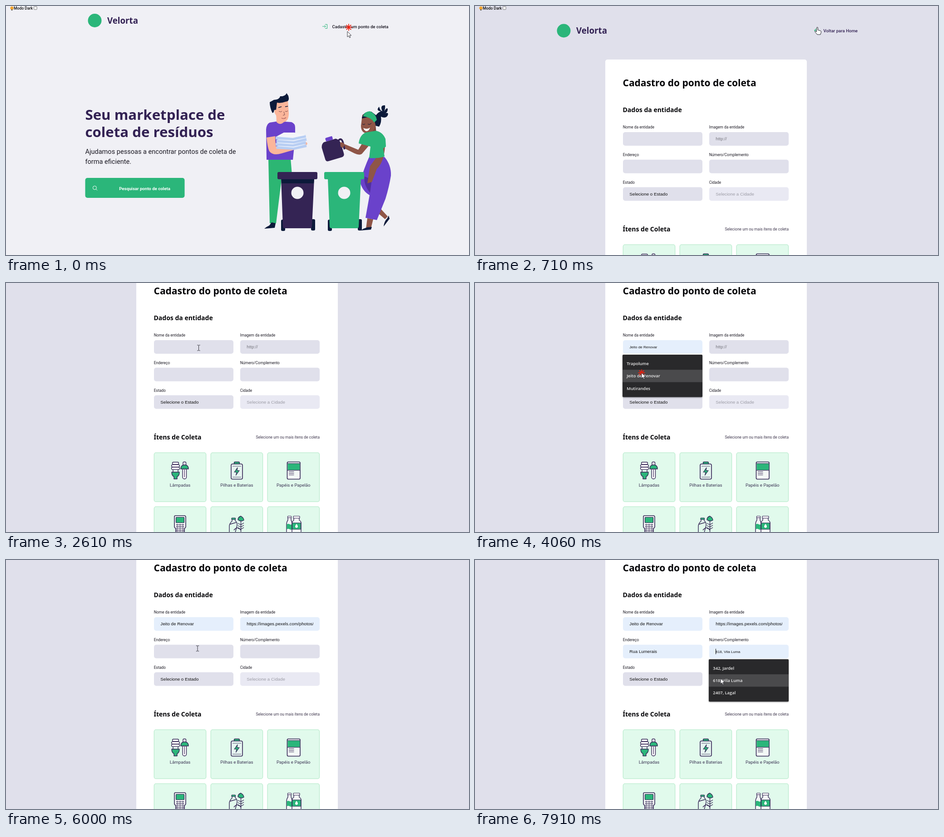
These frames come from a looping animation (1020 by 549 pixels, 8000 ms). An HTML page with a canvas:

```html
<!DOCTYPE html>
<html lang="pt-BR">
<head>
<meta charset="utf-8">
<title>Cadastro do ponto de coleta</title>
<style>
html, body { margin: 0; width: 100%; height: 100%; overflow: hidden; background: #f0f0f5; }
canvas { display: block; width: 1020px; height: 549px; }
</style>
</head>
<body>
<canvas id="stage"></canvas>
<script>
const W = 1020, H = 549, LOOP = 8000;
const canvas = document.getElementById('stage');
const g = canvas.getContext('2d');
const dpr = window.devicePixelRatio || 1;
canvas.width = W * dpr;
canvas.height = H * dpr;

const GREEN = '#2bb67a', PLUM = '#342454', NAVY = '#0c1a3a', PURPLE = '#6a42cb';
const PEACH = '#fbb59a', BROWN = '#8f5547', FIELD = '#e0e0eb', FILLED = '#e5effc', INK = '#322153';
const HEAD = '"Noto Sans", "Open Sans", sans-serif';
const BODY = 'Roboto, sans-serif';
const INPUT = '"Liberation Sans", Arial, sans-serif';
const MENU = '"Open Sans", "Noto Sans", sans-serif';

function text(s, x, y, size, family, color, weight = 400, align = 'left') {
  g.font = `${weight} ${size}px ${family}`;
  g.fillStyle = color;
  g.textAlign = align;
  g.fillText(s, x, y);
}
function paint(path, fill, stroke, lw = 1.4) {
  const args = path ? [path] : [];
  if (fill) { g.fillStyle = fill; g.fill(...args); }
  if (stroke) { g.strokeStyle = stroke; g.lineWidth = lw; g.stroke(...args); }
}
function box(x, y, w, h, r, fill, stroke, lw = 1.2) {
  g.beginPath();
  g.roundRect(x, y, w, h, r);
  paint(null, fill, stroke, lw);
}
const shape = (d, fill, stroke, lw) => paint(new Path2D(d), fill, stroke, lw);
const line = (d, color, lw) => shape(d, null, color, lw);
function disc(x, y, r, fill) {
  g.beginPath();
  g.arc(x, y, r, 0, 7);
  paint(null, fill);
}
// Draw inside a clipping rectangle
function clipped(x, y, w, h, draw) {
  g.save();
  g.beginPath();
  g.rect(x, y, w, h);
  g.clip();
  draw();
  g.restore();
}
// Last entry whose time has passed
const latest = (keys, t) => keys.reduce((hit, k) => k[0] <= t ? k : hit, null);

/* ---------- timeline ---------- */
const OPEN_FORM = 710;
const scrollKeys = [[0, 0], [1790, 30], [1920, 110], [2040, 152]];
const cursorKeys = [
  [0, 752, 56], [130, 754, 47], [840, 720, 72], [960, 646, 129], [1100, 575, 190], [1230, 529, 236],
  [1370, 486, 288], [1520, 479, 291], [1640, 477, 299], [2190, 450, 280], [2320, 421, 250],
  [2460, 425, 163], [2610, 424.5, 143], [3410, 400, 172], [3540, 385, 180], [3790, 370, 192],
  [3920, 367, 198], [4320, 420, 180], [4450, 500, 155], [4580, 535, 144], [4970, 555, 165],
  [5100, 560, 181], [5620, 510, 183], [5750, 440, 195], [5880, 422, 195], [6440, 390, 226],
  [6570, 367, 247], [6710, 366, 259], [7220, 430, 245], [7350, 540, 200], [7630, 537, 243],
  [7770, 541, 261]
];
const kindKeys = [
  [0, 'arrow'], [130, 'hand'], [840, 'arrow'], [2460, 'beam'], [3410, 'arrow'], [4580, 'beam'],
  [4970, 'arrow'], [5880, 'beam'], [6440, 'arrow'], [6710, 'lightBeam'], [7090, 'arrow'],
  [7350, 'beam'], [7630, 'arrow']
];
const clicks = [[0, 130, 755, 47], [3920, 4200, 367, 198], [5350, 5490, 560, 181], [7090, 7220, 366, 259]];
const PHOTOS = 'https://images.pexels.com/photos/';
const menus = [
  { x: 326, y: 278, w: 176, open: 3140, close: 4200, hover: [[3410, 0], [3790, 1]],
    rows: ['Trapolume', 'Jeito de Renovar', 'Mutirandes'] },
  { x: 516, y: 278, w: 346, open: 4830, close: 5490, hover: [[4970, 0]],
    rows: [PHOTOS + '3735195/pexels-photo-3735195.jpeg?auto', PHOTOS + '2453797/pexels-photo-2453797.jpeg?auto',
           PHOTOS + '159751/book-address-book-learning-learning'] },
  { x: 326, y: 338.7, w: 176, open: 6290, close: 7220, hover: [[6440, 0], [6850, 1]],
    rows: ['Rua Borvelhas', 'Rua Lumerais', 'Rua Olitanha'] },
  { x: 516, y: 338.7, w: 176, open: 7500, close: 9000, hover: [[7630, 0], [7910, 1]],
    rows: ['342, Jardel', '618, Vila Luma', '2407, Lagal'] }
];
const picked = (m, t) => { const k = latest(m.hover, t); return k ? k[1] : -1; };

/* ---------- shared header ---------- */
function header(y) {
  disc(13, 4.5, 3.6, '#f2a32c');
  box(11.5, 7, 3, 3, 1, '#6d6250');
  text('Modo Dark', 17, 8.3, 8.6, BODY, '#111', 500);
  box(61.5, 1.2, 6.6, 6.6, 1, '#fff', '#666', 0.9);
  disc(195.5, y, 15, GREEN);
  text('Velorta', 223, y + 6.6, 18.7, HEAD, INK, 700);
}

/* ---------- home page ---------- */
function man() {
  shape('M578 336H627L630 372L607 382L595 479H581Z', '#2cb673');
  shape('M585 477L594 479L592 489L569 491Q575 486 580 484Z', NAVY);
  shape('M581 257L600 254L629 256Q637 259 637 268V290L632 339H574L573 272Q574 260 581 257Z', PURPLE);
  shape('M595 235L596 256Q604 264 612 256L612 246Z', PEACH);
  shape('M594 212L621 207L623 236Q623 254 612 256Q599 256 595 241Q590 235 592 229Z', PEACH);
  shape('M587 236Q581 224 581 212Q587 209 590 207Q603 206 604 199L609 199Q617 197 618 192L622 198L623 203Q624 210 616 211Q605 215 597 213L595 229Q590 228 590 234Z', NAVY);
  line('M600 224L607 222M615 222L621 221', NAVY, 1.6);
  line('M601 232Q605 235 608 232M615 232Q618 234 621 231M612 233L614 240L610 241', '#6d3f47', 0.9);
  line('M607 247Q612 250 617 246', '#9a4c50', 1.1);
  shape('M574 290L593 287L594 309L635 311L655 301Q662 298 664 303Q663 309 652 312L607 325Q588 331 580 320Q576 311 574 290Z', PEACH);
  for (let i = 3; i >= 0; i--) {
    g.save();
    g.translate((i % 2) * 1.5, i * 7);
    shape('M594 288L616 288L660 284L661 290L633 296L594 294Z', '#b8cef3');
    shape('M594 288L613 284L660 284L632 291Z', '#edf2fc');
    g.restore();
  }
  shape('M597 287L612 279L635 279L660 285L633 290Z', '#f4f4f9');
}
function woman() {
  shape('M819 440L841 464L835 470L812 450Z', BROWN);
  shape('M843 462L845 469L832 486Q833 475 840 468Z', NAVY);
  shape('M796 468L809 470L804 490L793 491Z', BROWN);
  shape('M781 495Q788 490 796 488L806 487L804 493Z', NAVY);
  shape('M800 333H834Q849 351 848 374Q844 399 836 425L817 472L792 467L801 417Q785 408 780 388Q789 357 800 333Z', PURPLE);
  shape('M790 376Q787 393 802 412L806 382Z', '#512f9f');
  shape('M815 241Q819 235 826 232Q814 231 822 222Q824 231 829 232Q823 218 835 219Q836 228 832 234Q840 221 841 228Q840 236 834 237Q844 233 841 241Q837 249 826 244Q828 256 822 266L810 263Z', NAVY);
  shape('M798 263L814 261L816 282L798 286Z', '#7c453b');
  shape('M785 240Q797 233 809 242L814 262Q811 280 796 281Q782 280 782 264Z', BROWN);
  shape('M784 248Q786 232 805 233L822 246Q821 260 817 264Q811 247 797 245Z', NAVY);
  shape('M786 243Q791 232 802 232Q815 238 817 251L811 257Q804 245 786 243Z', GREEN);
  shape('M787 269Q796 273 802 268Q799 277 793 276Q789 274 787 269Z', '#fff');
  line('M785 260Q788 263 791 260M797 260Q801 263 805 258', NAVY, 1);
  shape('M738 302L747 305L776 317L787 299L801 306L784 326Q779 330 768 325L738 310Z', BROWN);
  shape('M816 304L835 309Q833 344 817 359L806 388L796 391L802 353L818 331Z', BROWN);
  shape('M792 279L815 275Q830 278 836 293L837 310L831 314L834 332Q816 337 800 335L803 310L777 303Q779 285 792 279Z', GREEN);
  g.save();
  g.translate(719.5, 315.5);
  g.rotate(-0.29);
  line('M17 -14Q26 -20 26 -8L25 8', PLUM, 4);
  shape('M-14 -20H13Q20 -16 21 -8L21 16Q21 23 14 23H-16Q-22 23 -22 17V-10Q-20 -18 -14 -20Z', PLUM);
  box(-9, -28, 16, 8, 2, PURPLE);
  g.restore();
  shape('M736 301Q744 299 746 307L742 313L737 310Z', BROWN);
}
function bin(x, color, rim) {
  box(x + 8, 471, 9, 25, 3, NAVY);
  box(x + 74, 470, 9, 25, 3, NAVY);
  shape(`M${x + 8} 380H${x + 81}L${x + 76} 486Q${x + 76} 490 ${x + 72} 490H${x + 16}Q${x + 12} 490 ${x + 12} 486Z`, color);
  shape(`M${x + 9} 381H${x + 81}L${x + 80} 391H${x + 9}Z`, rim);
  box(x, 366, 88, 16, 3, color);
  disc(x + 44, 412, 13.5, '#f0f0f5');
}
function home() {
  g.fillStyle = '#f0f0f5';
  g.fillRect(0, 0, W, H);
  header(32);
  line('M703 40.5H707.5V49.5H703M697 45H704M701.5 42.3L704.3 45L701.5 47.7', GREEN, 1);
  text('Cadastre um ponto de coleta', 842.5, 48.5, 9.65, BODY, '#16131f', 500, 'right');
  text('Seu marketplace de', 174.5, 251.3, 31.2, HEAD, INK, 700);
  text('coleta de resíduos', 174.5, 288.8, 31.2, HEAD, INK, 700);
  text('Ajudamos pessoas a encontrar pontos de coleta de', 174.5, 326, 14.55, BODY, '#1c1a24');
  text('forma eficiente.', 174.5, 348.3, 14.55, BODY, '#1c1a24');
  box(174.5, 379, 219, 44, 5, GREEN);
  line('M199.4 400.8A4 4 0 1 1 191.4 400.8A4 4 0 1 1 199.4 400.8M198.4 403.8L201 406.5', '#fff', 1);
  text('Pesquisar ponto de coleta', 305.5, 405.5, 9.65, BODY, '#fff', 700, 'center');
  man();
  woman();
  bin(598, PLUM, NAVY);
  bin(701, GREEN, GREEN);
}

/* ---------- form page ---------- */
const icons = [
  () => {
    shape('M365 417H382Q382 425 377 427V432H370V427Q365 425 365 417Z', GREEN, PLUM);
    for (let i = 0; i < 3; i++) box(364.5 + (i ? 0 : 2), 395 + i * 5.6, i ? 18 : 14, 5, 2.5, '#fff', PLUM, 1.3);
    line('M368 412V417M379 412V417', PLUM, 1.4);
    box(389, 409, 8.5, 23, 4, '#fff', PLUM, 1.4);
    line('M393.2 411V428', PLUM, 1.2);
    box(390, 394.5, 6.5, 8, 2, '#fff', PLUM, 1.4);
    shape('M385 410Q385 401 393.3 401Q402 401 402 410Z', GREEN, PLUM);
  },
  () => {
    box(502.5, 394.5, 12, 6, 2, GREEN, PLUM, 1.4);
    box(496, 399, 25, 33.5, 3, '#e6f5f0', PLUM, 1.6);
    line('M499 404H518M499 428H518', PLUM, 0.8);
    shape('M510 407L503 417H508L506.5 424L514 413.5H509Z', GREEN, PLUM, 1.1);
  },
  () => {
    box(619.5, 394.5, 28.5, 38, 2.5, '#f3f8f6', PLUM, 1.6);
    g.fillStyle = GREEN;
    g.fillRect(620.5, 398, 26.8, 14.5);
    line('M620 398H648M620 412.8H648M623 416H634.5M623 419.5H634.5M623 423H634.5', PLUM, 1.2);
  },
  () => {
    shape('M371 515Q371 513 373 513H393Q396 513 396 516V538L393 542V560H374V542L371 538Z', '#f3f8f6', PLUM, 1.6);
    box(374.5, 516.5, 18, 12, 1, GREEN, PLUM, 1.2);
    for (let i = 0; i < 12; i++) box(375.5 + i % 3 * 6, 532 + Math.floor(i / 3) * 4.5, 4, 2, 0.5, null, PLUM, 1);
  },
  () => {
    shape('M498 519H505V524Q510 528 509 535L505 550H492V537Q492 530 498 525Z', '#e1faec', PLUM);
    box(497, 518, 8.5, 3.5, 1, GREEN, PLUM, 1.2);
    line('M493 532L507 528M502 545Q511 534 518 546', PLUM, 1.4);
    shape('M511 522Q511 516 517.5 514Q524 518 524 523Q517 527 511 522Z', GREEN, PLUM);
    line('M517.5 525V550M511 530L517.5 533L524 529M511 535L517.5 538L524 534M511 541L517.5 543L524 539', PLUM, 1.3);
  },
  () => {
    shape('M621 517H628V523Q632 529 631 550H618V533Q618 527 621 523Z', '#f3f8f6', PLUM);
    shape('M618.6 532Q622 530 625 532T631 531V543Q628 545 625 543T618.6 543Z', GREEN);
    box(620.5, 514, 8, 3.5, 1, '#fff', PLUM, 1.2);
    shape('M634 518H646V523Q651 526 650 531V550H630V531Q630 526 634 523Z', '#f3f8f6', PLUM);
    box(633, 514, 14, 4.5, 1, '#fff', PLUM, 1.2);
    box(630.6, 529, 19, 14, 0, GREEN, PLUM, 1);
    shape('M640 531Q646 539 640 540Q634 539 640 531Z', '#fff');
  }
];

function field(x, y, label, value, color, fill = FIELD, size = 9.75) {
  text(label, x - 0.3, y - 8, 8.5, BODY, '#1c1a24');
  box(x, y, 175, 30, 5, fill);
  clipped(x + 14, y, 147, 30, () => {
    text(value, x + 14.3, y + (size < 9 ? 17.8 : 18.4), size, INPUT, color);
  });
}
function entry(i, label, hint, t) {
  const m = menus[i], pick = picked(m, t), done = t >= m.close;
  const on = pick >= 0;
  field(m.x, m.y, label, on ? m.rows[pick] : hint, on ? '#111' : '#75757d',
    on ? FILLED : FIELD, on && !done ? 8.1 : 9.75);
  const focus = t - m.open;
  if (focus >= 0 && !done && Math.floor(focus / 530) % 2 === 0) {
    g.fillStyle = '#111';
    g.fillRect(m.x + 14, m.y + 9, 1, 12);
  }
}
function menu(m, t) {
  if (t < m.open || t >= m.close) return;
  const y = m.y + 32, x = m.x - 1, pick = picked(m, t);
  const rowTop = i => y + 6 + i * 27.3;
  g.save();
  g.shadowColor = 'rgba(0,0,0,.4)';
  g.shadowBlur = 3 * dpr;
  g.shadowOffsetY = dpr;
  box(x, y, m.w, 93.5, 2, '#29292b');
  g.restore();
  if (pick >= 0) {
    g.fillStyle = '#4a4a4c';
    g.fillRect(x, rowTop(pick), m.w, 27.3);
  }
  clipped(x, y, m.w - 8.5, 94, () => {
    m.rows.forEach((s, i) => text(s, x + 9.3, rowTop(i) + 17, 9.35, MENU, '#ececec', 600));
  });
}
function form(t) {
  g.fillStyle = FIELD;
  g.fillRect(0, 0, W, H);
  g.save();
  g.translate(0, -latest(scrollKeys, t)[1]);
  header(54.5);
  line('M748 54H756M752 50L748 54L752 58', GREEN, 1.2);
  text('Voltar para Home', 843, 57.8, 9.65, BODY, INK, 500, 'right');
  box(287, 118, 444, 900, 5, '#fff');
  text('Cadastro do ponto de coleta', 325.5, 176.6, 21, HEAD, '#050508', 700);
  text('Dados da entidade', 325.5, 233.6, 14, HEAD, '#050508', 700);
  entry(0, 'Nome da entidade', '', t);
  entry(1, 'Imagem da entidade', 'http://', t);
  entry(2, 'Endereço', '', t);
  entry(3, 'Número/Complemento', '', t);
  field(326, 399.5, 'Estado', 'Selecione o Estado', '#111');
  field(516, 399.5, 'Cidade', 'Selecione a Cidade', '#9c9ca6', '#e9e9f3');
  text('Ítens de Coleta', 325.5, 496.8, 14, HEAD, '#050508', 700);
  text('Selecione um ou mais ítens de coleta', 691, 494.8, 8.5, BODY, '#40394f', 400, 'right');
  const names = ['Lâmpadas', 'Pilhas e Baterias', 'Papéis e Papelão'];
  icons.forEach((draw, i) => {
    const x = 326.3 + i % 3 * 124.9, y = i < 3 ? 526.2 : 645.2;
    box(x, y, 114.4, 108, 4, '#e1faec', '#b9ebcd', 1.3);
    if (i < 3) text(names[i], x + 57.2, 601.4, 9.75, BODY, '#3b3454', 400, 'center');
    g.save();
    g.translate(0, 152);
    draw();
    g.restore();
  });
  menus.forEach(m => menu(m, t));
  g.restore();
}

/* ---------- pointer ---------- */
function star(x, y) {
  g.save();
  g.translate(x, y);
  for (let i = 0; i < 4; i++) {
    line('M-7.5 0H7.5', '#f0200f', 1.8);
    g.rotate(Math.PI / 4);
  }
  g.restore();
}
const beam = color =>
  line('M-3.2 -6H-0.8L0 -5.2L0.8 -6H3.2M0 -5.2V5.2M-3.2 6H-0.8L0 5.2L0.8 6H3.2', color, 1);
const pointers = {
  arrow: () => shape('M0 0V12.2L2.9 9.6L4.9 14L6.8 13.1L4.9 8.9H8.7Z', '#fff', '#26262e', 0.9),
  hand: () => shape('M-1 0Q1 -1 1.5 1V6L7 7.5Q9 8 8.5 11L7 16H0L-5 10Q-5.5 8 -3.5 8.5L-1.5 10Z', '#fff', '#26262e', 1),
  beam: () => beam('#33333c'),
  lightBeam: () => beam('#b9b9bd')
};
function pointer(t) {
  const [, x, y] = latest(cursorKeys, t);
  for (const [from, to, cx, cy] of clicks) if (t >= from && t < to) star(cx, cy);
  g.save();
  g.translate(x, y);
  pointers[latest(kindKeys, t)[1]]();
  g.restore();
}

function draw(now) {
  const t = Math.max(0, now + 4) % LOOP;
  g.setTransform(dpr, 0, 0, dpr, 0, 0);
  g.lineJoin = 'round';
  if (t < OPEN_FORM) home(); else form(t);
  pointer(t);
}
function tick() {
  draw(performance.now());
  requestAnimationFrame(tick);
}
tick();
</script>
</body>
</html>
```
